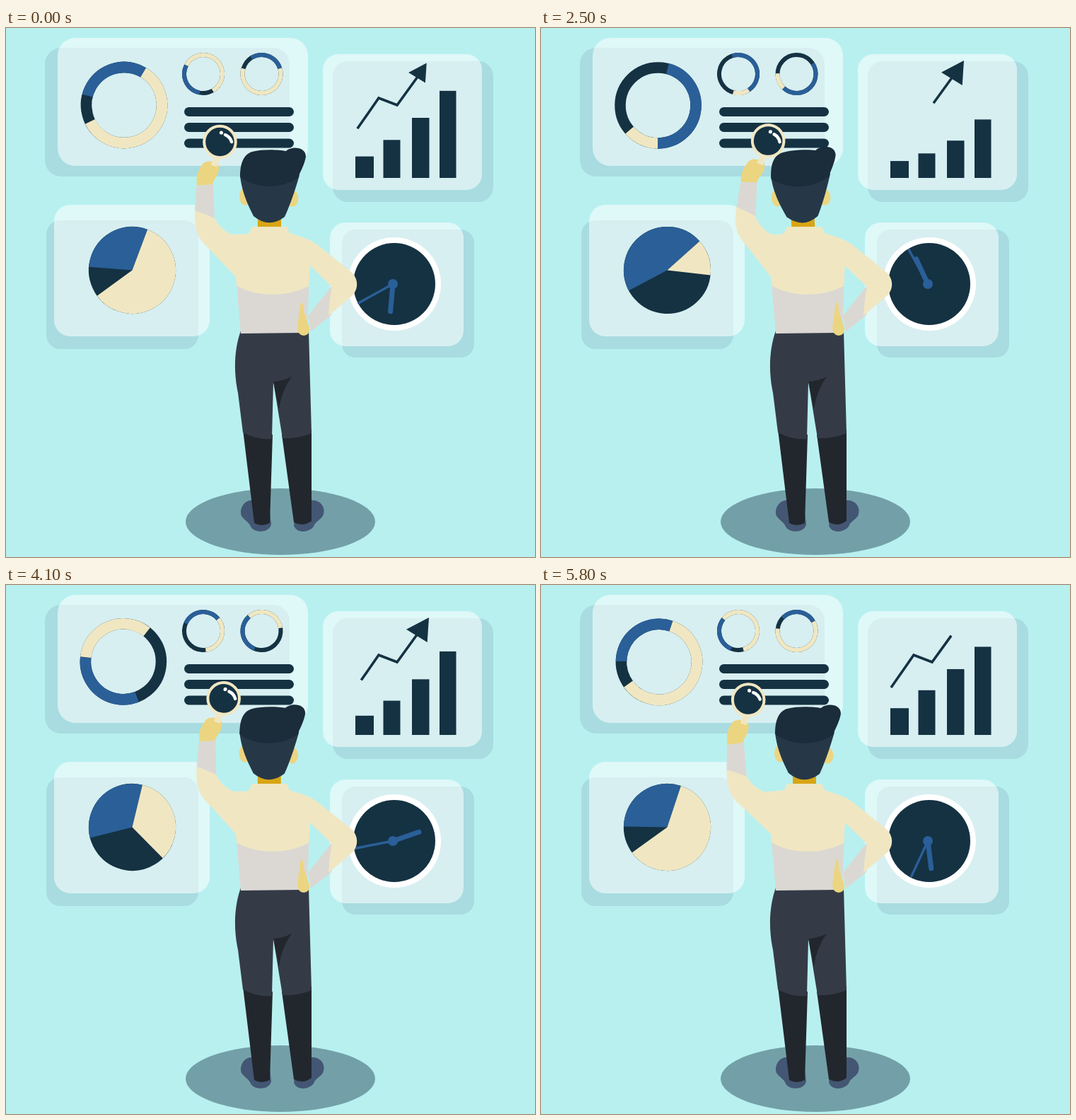
Animation, 748 px wide and 748 px high, one loop 5900 ms. Source, as an HTML page:

```html
<!DOCTYPE html>
<html lang="en">
<head>
<meta charset="utf-8">
<title>Dashboard analyst</title>
<style>
html, body { margin: 0; height: 100%; overflow: hidden; background: #b8f0f0 }
svg { display: block; width: 100vw; height: 100vh }
.shadow { fill: #a8dce0 }
.panel { fill: #fff; fill-opacity: .55 }
.dark { fill: #153243 }
.cream { fill: #f0e7c2 }
.grey { fill: #dbd8d3 }
.skin { fill: #ecd581 }
.pants { fill: #343b47 }
.shade { fill: #22272d }
.shoe { fill: #435673 }
.line { fill: none; stroke: #153243 }
</style>
</head>
<body>
<svg viewBox="0 0 748 748">
  <g class="shadow">
    <rect x="55" y="28" width="346" height="182" rx="23"/>
    <rect x="462" y="47" width="227" height="199" rx="21"/>
    <rect x="57" y="272" width="215" height="182" rx="20"/>
    <rect x="475" y="285" width="187" height="181" rx="19"/>
  </g>
  <g class="panel">
    <rect x="73" y="14" width="354" height="181" rx="25"/>
    <rect x="448" y="37" width="225" height="192" rx="22"/>
    <rect x="68" y="250" width="220" height="186" rx="23"/>
    <rect x="458" y="275" width="189" height="175" rx="22"/>
  </g>

  <g id="rings"></g>
  <g class="dark">
    <rect x="252" y="112" width="155" height="13" rx="6.5"/>
    <rect x="252" y="134" width="155" height="13" rx="6.5"/>
    <rect x="252" y="156.500" width="155" height="13" rx="6.5"/>
  </g>

  <g id="bars" class="dark"></g>
  <path id="trend" class="line" stroke-width="3.6" pathLength="1" d="M495 145L527 99L553 109L582 69"/>
  <path id="tip" class="dark" d="M16.300 -17.700L-15.700 -1L14 17.300Z"/>

  <circle cx="549" cy="362" r="66" fill="#fff"/>
  <circle cx="549" cy="362" r="58" class="dark"/>
  <g stroke="#2a5f98" stroke-linecap="round">
    <path id="hour" stroke-width="7" d="M0 0V-39"/>
    <path id="minute" stroke-width="3.4" d="M0 0V-55"/>
    <circle cx="547" cy="362" r="7" fill="#2a5f98" stroke="none"/>
  </g>

  <ellipse cx="388" cy="698" rx="134" ry="47" fill="#73a0a8"/>
  <g class="shoe">
    <path d="M350 668C338 666 329 679 333 690C337 696 343 698 346 705C350 714 372 715 375 702L373 685Z"/>
    <path d="M430 668C446 666 453 680 448 690C444 696 437 698 435 705C428 714 410 715 407 703L410 685Z"/>
  </g>
  <path class="shade" d="M335 568L351 700Q361 706 373 700L377 575ZM390 575L407 699Q420 706 432 697V568Z"/>
  <path class="pants" d="M332 428C322 456 322 488 328 516L335 572Q356 583 376 581L378 500L391 580Q413 581 432 573L428 428Z"/>
  <path class="shade" d="M378 500Q392 499 404 493Q390 512 386 539Z"/>

  <g id="head">
    <ellipse class="skin" cx="338" cy="238" rx="8" ry="12.500"/>
    <ellipse class="skin" cx="405" cy="241" rx="8.500" ry="11.500"/>
    <path fill="#d9a514" d="M356 265H389V288H356Z"/>
    <path fill="#263847" d="M331 208C333 232 343 252 350 266Q372 284 394 267Q405 243 415 208Z"/>
    <path fill="#1b2c3a" d="M331 211C331 193 335 179 348 175C363 171 385 172 396 174C403 167 424 167 424 182C422 194 415 205 413 212Q394 224 372 224Q347 223 331 211Z"/>
  </g>

  <path class="grey" d="M325 350L332 432L416 431Q425 431 426 426L429 350Z"/>
  <path class="grey" d="M461 364L427 407L431 429L460 406Z"/>
  <path class="cream" d="M348 281H397L401 290C420 296 433 300 442 308L487 344C498 353 499 367 491 377L456 407Q457 386 461 366L430 336L428 365Q404 377 376 377Q346 376 326 364L325 352L312 300Q336 293 344 290Z"/>
  <path class="skin" d="M417 387Q422 391 421 401L429 424Q430 434 421 435Q413 435 412 424L414 408Z"/>

  <g id="arm">
    <path class="grey" d="M269 224L293 220L295 271L267 261Z"/>
    <path class="cream" d="M267 258Q281 263 295 269Q302 284 319 292L344 291L330 355L325 352L288 313C271 298 266 286 267 258Z"/>
    <path class="skin" d="M270 223C268 209 272 201 277 194C280 186 300 187 301 196C302 208 295 211 292 221Z"/>
    <path d="M299 180L294 195" stroke="#f0e7c2" stroke-width="9"/>
    <circle cx="302.500" cy="161" r="22.300" class="dark" stroke="#f0e7c2" stroke-width="4"/>
    <circle cx="304.500" cy="148" r="2.600" fill="#fff"/>
    <path d="M310 151Q317 154 319 161" fill="none" stroke="#fff" stroke-width="4.500" stroke-linecap="round"/>
  </g>
</svg>
<script>
const byId = id => document.getElementById(id);
const set = (el, attrs) => { for (const k in attrs) el.setAttribute(k, attrs[k]); return el; };
const add = (parent, name, attrs) =>
  set(parent.appendChild(document.createElementNS('http://www.w3.org/2000/svg', name)), attrs);
const clamp = v => Math.max(0, Math.min(1, v));
const ease = v => (1 - Math.cos(Math.PI * clamp(v))) / 2;
// two-second swing, phase in degrees
const swing = (t, phase) => Math.cos(Math.PI * (t + phase / 180));

// Segment lengths in degrees at key times, joined by a periodic cubic spline
const keys = [0, 1, 1.7, 2.5, 3.5, 4.7, 5.8], span = 6;
const blueLen = [106, 75.5, 208, 166, 170, 70, 107.5];
const creamLen = [213.5, 141, 76.5, 48.5, 83, 162.5, 216];
function spline(vals, t) {
  const n = keys.length;
  const at = i => keys[(i + n) % n] + span * Math.floor(i / n);
  const val = i => vals[(i + n) % n];
  const slope = i => (val(i + 1) - val(i - 1)) / (at(i + 1) - at(i - 1));
  let i = n - 1;
  while (keys[i] > t) i--;
  const h = at(i + 1) - at(i), u = (t - at(i)) / h, w = 1 - u;
  return val(i) * w * w * (1 + 2 * u) + val(i + 1) * u * u * (3 - 2 * u)
    + h * u * w * (slope(i) * w - slope(i + 1) * u);
}

// Each ring's angle is where its blue segment meets the cream one
const rings = [
  { x: 166.2, y: 109, r: 53.5, w: 15.5, angle: t => 30.5 + 60 * t, drift: .8 },
  { x: 279, y: 65, r: 27, w: 6, angle: t => 297 - 60 * t, drift: 0 },
  { x: 361.5, y: 65, r: 27, w: 6, angle: t => 73 + 60 * t, drift: 0 },
  { x: 178.5, y: 342.5, r: 30.75, w: 61.5, angle: t => 30 + 23 * Math.sin(2 * Math.PI * (t - .4) / 5.9), drift: 0 }
];
for (const ring of rings) {
  ring.g = add(byId('rings'), 'g', { fill: 'none', 'stroke-width': ring.w });
  [ring.dark, ring.blue, ring.cream] = ['#153243', '#2a5f98', '#f0e7c2'].map(stroke =>
    add(ring.g, 'circle', { r: ring.r, stroke, pathLength: 360 }));
}

const bars = [
  { x: 494, w: 26, top: 177, amp: 12 },
  { x: 533.5, w: 24, top: 160.5, amp: 17 },
  { x: 574, w: 24.5, top: 141, amp: 23 },
  { x: 613, w: 23.5, top: 117.5, amp: 31 }
];
for (const bar of bars) bar.el = add(byId('bars'), 'rect', { x: bar.x, width: bar.w });

function draw(t) {
  const blue = spline(blueLen, t), cream = spline(creamLen, t);
  for (const { g, x, y, angle, drift, ...ring } of rings) {
    const a = angle(t), turn = Math.PI * t / 3;
    set(g, { transform: `translate(${x + drift * Math.cos(turn)} ${y + drift * Math.sin(turn)}) rotate(${a - 90})` });
    set(ring.blue, { 'stroke-dasharray': `${blue} 360`, transform: `rotate(${-blue})` });
    set(ring.cream, { 'stroke-dasharray': `${cream} 360` });
  }

  bars.forEach(({ el, top, amp }, i) => {
    const y = top + amp * swing(t, -67.5 - 30 * i);
    set(el, { y, height: 212 - y });
  });

  // the trend line draws itself in one second and wipes away in the next
  const p = (t + 1.1) % 2, from = ease(p - 1), to = ease(p);
  set(byId('trend'), { 'stroke-dasharray': `0 ${from} ${to - from} 9` });
  const size = Math.min(clamp((p - .9) / .25), clamp((1.87 - p) / .27));
  set(byId('tip'), { transform: `translate(581.7 63.7) scale(${size})` });

  set(byId('hour'), { transform: `translate(547 362) rotate(${185 + 60 * t})` });
  set(byId('minute'), { transform: `translate(547 362) rotate(${241 + 180 * t})` });
  set(byId('arm'), { transform: `rotate(${5 * swing(t, -97) + .6} 327 352)` });
  set(byId('head'), { transform: `rotate(${2.55 * (swing(t, 18) - .951)} 373 312)` });
}

function loop() {
  draw(Math.floor(performance.now() % 5900 / 100) / 10);
  requestAnimationFrame(loop);
}
loop();
</script>
</body>
</html>
```
